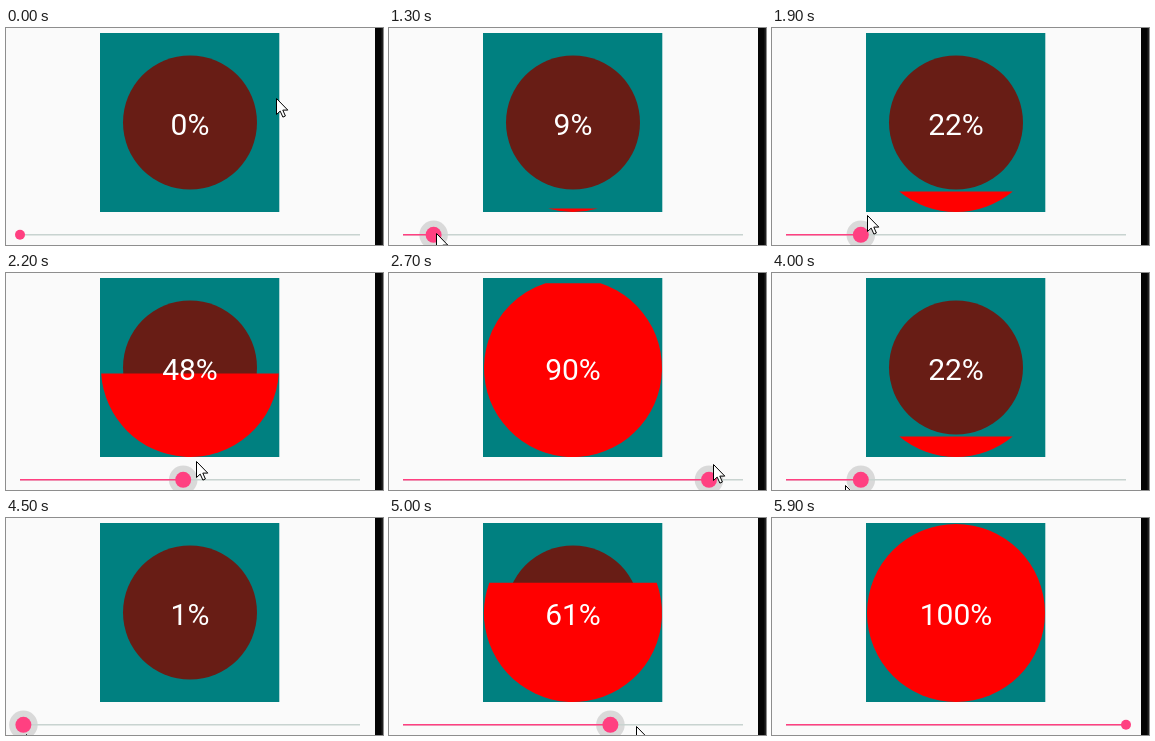
Animation of 377 by 217 pixels, one loop 6300 ms. Source, as an HTML page with a canvas:

```html
<!DOCTYPE html>
<html lang="en">
<head>
<meta charset="utf-8">
<title>Circle fill slider</title>
<style>
html, body { margin: 0; width: 100%; height: 100%; overflow: hidden; background: #fafafa; }
canvas { display: block; }
</style>
</head>
<body>
<canvas id="stage" width="377" height="217"></canvas>
<script>
const ctx = document.getElementById('stage').getContext('2d');
const LOOP = 6300, STEP = 100;
const CX = 184, CY = 95, R = 89;
const TRACK = { x: 14, y: 206.8, w: 340 };
const PINK = '#ff4081';

// Each move eases to its values between from and to; a larger k starts faster.
const levelMoves = [
  { from: 900, to: 1600, v: 11, k: 1.5 },
  { from: 1600, to: 3000, v: 98, k: 1.07 },
  { from: 3000, to: 3100, v: 100, k: 1 },
  { from: 3500, to: 4500, v: 1, k: 1.75 },
  { from: 4700, to: 5400, v: 100, k: 1.5 }
];
const pressMoves = [
  { from: 900, to: 1300, v: 1, k: 1 },
  { from: 5500, to: 5800, v: 0, k: 1 }
];
const pointerMoves = [
  { from: 0, to: 200, x: 39, y: 175, k: 1 },
  { from: 300, to: 700, x: 19, y: 203, k: 1 },
  { from: 900, to: 1450, x: 49, y: 205, k: 1.5 },
  { from: 1450, to: 1650, x: 58, y: 186, k: 1 },
  { from: 1650, to: 3200, x: 356, y: 191.5, k: 1.41 },
  { from: 3400, to: 4500, x: 20, y: 216, k: 1.75 },
  { from: 4700, to: 5400, x: 357, y: 204, k: 1.72 },
  { from: 5500, to: 5800, x: 372, y: 30, k: 1 }
];

function ease({ from, to, k }, t) {
  const u = 1 - (1 - Math.min(1, Math.max(0, (t - from) / (to - from)))) ** k;
  return u * u * (3 - 2 * u);
}

const follow = (moves, key, start, t) =>
  moves.reduce((value, move) => value + (move[key] - value) * ease(move, t), start);

function rect(x, y, w, h, color) {
  ctx.fillStyle = color;
  ctx.fillRect(x, y, w, h);
}

function disc(x, y, r, color, from = 0, to = Math.PI * 2) {
  ctx.fillStyle = color;
  ctx.beginPath();
  ctx.arc(x, y, r, from, to);
  ctx.fill();
}

function drawGauge(percent) {
  rect(94, 5, 179.3, 179, '#008080');
  disc(CX, CY - 0.5, 67, '#681d15');
  const half = Math.PI * percent / 100;
  if (percent > 0) disc(CX, CY, R, '#ff0000', Math.PI / 2 - half, Math.PI / 2 + half);
  ctx.fillStyle = '#fff';
  ctx.font = '30px Roboto, sans-serif';
  ctx.textAlign = 'center';
  ctx.fillText(percent + '%', CX, 107);
}

function drawSlider(percent, press) {
  const { x: left, y, w } = TRACK;
  const x = left + w * percent / 100;
  if (press > 0) disc(x, y, 5 + 9.3 * press, `rgba(0,0,0,${0.13 * press})`);
  rect(left, y - 0.8, w, 1.5, '#c8d3d0');
  rect(left, y - 0.8, x - left, 1.5, PINK);
  disc(x, y, 5 + 3 * press, PINK);
}

function drawPointer(x, y) {
  const shape = [[0, 0], [0, 16], [3.7, 12.6], [6.4, 18.6], [8.9, 17.5], [6.3, 11.6], [11.3, 11.6]];
  ctx.beginPath();
  shape.forEach(([dx, dy]) => ctx.lineTo(x + 0.5 + dx, y + 0.5 + dy));
  ctx.closePath();
  ctx.fillStyle = '#fff';
  ctx.fill();
  ctx.strokeStyle = '#000';
  ctx.lineWidth = 1;
  ctx.stroke();
}

function draw(time) {
  const t = Math.floor((time % LOOP) / STEP) * STEP;
  rect(0, 0, 377, 217, '#fafafa');
  drawGauge(Math.round(follow(levelMoves, 'v', 0, t)));
  drawSlider(Math.round(follow(levelMoves, 'v', 0, t)), follow(pressMoves, 'v', 0, t));
  rect(369, 0, 8, 217, '#050505');
  rect(375.5, 0, 1.5, 217, '#222');
  if (t < 5900) {
    drawPointer(
      Math.round(follow(pointerMoves, 'x', 270, t)),
      Math.round(follow(pointerMoves, 'y', 70, t))
    );
  }
}

const start = performance.now();
function tick() {
  draw(performance.now() - start);
  requestAnimationFrame(tick);
}
tick();
</script>
</body>
</html>
```
